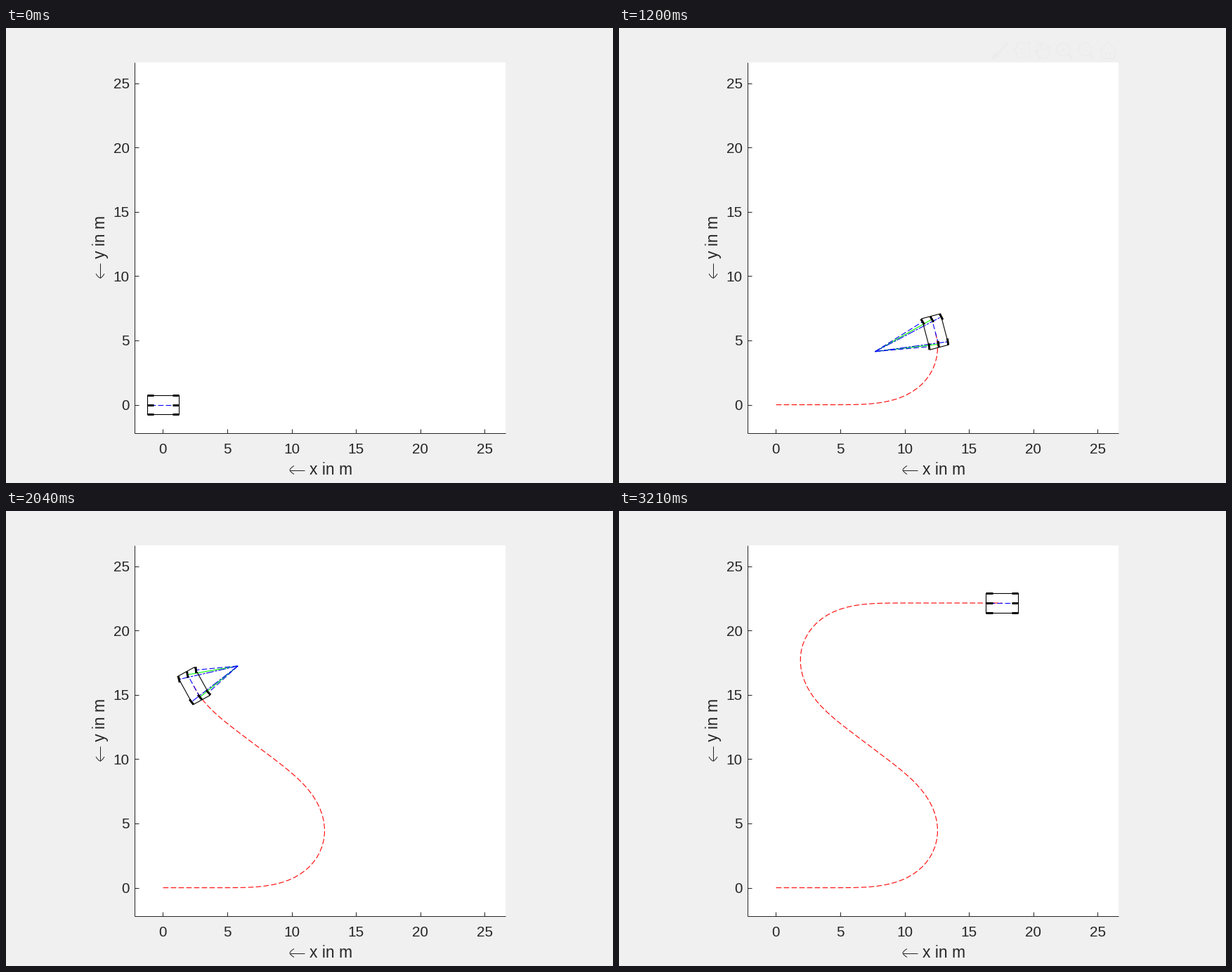
A matplotlib script that plays this animation: 864 px wide and 648 px high, repeating every 3.24 s.

```python
import numpy as np
import matplotlib.pyplot as plt
from matplotlib.animation import FuncAnimation
from matplotlib.patches import Circle, Ellipse, Rectangle

plt.rcParams["font.family"] = "Liberation Sans"
plt.rcParams["toolbar"] = "None"

W, H = 864, 648
SCALE, X0, Y0 = 18.32, 223.4, 536.55
LEFT, RIGHT, TOP, BOTTOM = 183.06, 711.18, 48.6, 576.72
INK, GREY = "#262626", "#cfcfcf"
SLOTS, SLOT_MS = 108, 30

fig = plt.figure(figsize=(W / 72, H / 72), dpi=72, facecolor="#f0f0f0")
ax = fig.add_axes([0, 0, 1, 1])
ax.set_xlim(0, W)
ax.set_ylim(H, 0)
ax.axis("off")


def to_px(p):
    p = np.asarray(p, float)
    return X0 + SCALE * p[..., 0], Y0 - SCALE * p[..., 1]


def stroke(xs, ys, color=INK, lw=1.0, **kw):
    kw.setdefault("solid_capstyle", "butt")
    return ax.plot(xs, ys, color=color, lw=lw, **kw)[0]


# ---- axes frame ----
stage = ax.add_patch(Rectangle((LEFT, TOP), RIGHT - LEFT, BOTTOM - TOP,
                               fc="white", ec="none", zorder=0))
stroke([LEFT, LEFT], [TOP, BOTTOM])
stroke([LEFT, RIGHT], [BOTTOM, BOTTOM])
for v in range(0, 26, 5):
    tx, ty = to_px((v, v))
    stroke([tx, tx], [BOTTOM, BOTTOM - 6])
    stroke([LEFT, LEFT + 6], [ty, ty])
    ax.text(tx, 606, str(v), size=20.8, color=INK, ha="center", va="baseline")
    ax.text(175.5, ty + 7.5, str(v), size=20.8, color=INK, ha="right",
            va="baseline")
ax.text(431.5, 636, "x in m", size=22.9, color=INK, va="baseline")
ax.text(141, 328.5, "y in m", size=22.9, color=INK, rotation=90,
        rotation_mode="anchor", va="baseline")

# label arrows: a shaft and a curved head
u = np.linspace(-1, 1, 21)
head_along, head_across = 6 * np.abs(u) ** 1.6, 6 * u
stroke([404, 425], [629.5, 629.5])
stroke(404 + head_along, 629.5 + head_across)
stroke([134, 134], [335, 356])
stroke(134 + head_across, 356 - head_along)

# ---- fading toolbar ----
tools = []


def icon(xs, ys, lw=1.6):
    tools.append(stroke(xs, ys, GREY, lw, solid_joinstyle="round"))


def magnifier(cx, plus):
    tools.append(ax.add_patch(Circle((cx, 30.5), 9, fc="none", ec=GREY, lw=1.6)))
    icon([cx + 6.5, cx + 13], [37, 44], 2.4)
    icon([cx - 4.5, cx + 4.5], [30.5, 30.5])
    if plus:
        icon([cx, cx], [26, 35])


# brush
icon([553, 541], [20.5, 35], 3.5)
tools.append(ax.add_patch(Ellipse((536, 39.5), 14, 7, angle=-40,
                                  fc=GREY, ec="none")))
# data tip
icon([566, 566, 584, 584, 566, 566, 561, 566], [28, 22, 22, 42, 42, 36, 32, 28])
for y in (29.5, 35):
    icon([570, 580], [y, y])
# hand
arc = np.linspace(0, np.pi, 12)
for i in range(4):
    x, top = 598 + 4.2 * i, 22 + 1.2 * (i - 1) ** 2
    icon(x - 2 * np.cos(arc), top + 1 - 2 * np.sin(arc))
    icon([x - 2, x - 2], [top + 1, 33])
icon([612.6, 612.6], [26, 35])
icon(604.3 + 8.3 * np.cos(arc[:9]), 35 + 9 * np.sin(arc[:9]))
icon([600, 591, 593, 597], [43, 32, 31, 35])
magnifier(632.5, True)
magnifier(663.5, False)
# house
icon([684, 695.7, 708], [33, 20.5, 33])
icon([687, 687, 704.5, 704.5], [31, 44, 44, 31])
icon([693, 693, 699, 699], [44, 36, 36, 44])


def toolbar_alpha(ms):
    return sum(np.interp(ms - start, [0, 300, 360, 530], [0, 1, 1, 0])
               for start in (100, 1170, 2370))


# ---- motion: a left turn, then the same turn to the right ----
START, LENGTH, GAP = 3.95, 19.35, 0.85      # metres along the track
ANGLE = np.radians(143)
CRUISE, RAMP = 0.675, 2.87                  # metres per step, metres to get there
PIVOT = -0.3                                # pivot line behind the centre


def turned(u):
    """Share of the turn done, with a sine-squared curvature."""
    u = np.clip(u, 0, 1)
    return u - np.sin(2 * np.pi * u) / (2 * np.pi)


def steer(u):
    """Curvature set by the wheels, which lead the car."""
    return 0.284 * np.sin(np.pi * np.clip(u / 0.845, 0, 1))


ds = 0.01
s = np.arange(0, 55, ds) + ds / 2
u1 = (s - START) / LENGTH
u2 = u1 - 1 - GAP / LENGTH
track_dir = ANGLE * (turned(u1) - turned(u2))
curve = steer(u1) - steer(u2)
speed = (CRUISE - 0.72 * np.abs(curve)) * np.sqrt(np.minimum(1, s / RAMP))
step_at = np.cumsum(ds / speed)

# the picture pauses at a regular beat
pauses = {1, 91} | {k + d for k in range(14, 81, 11) for d in (0, 1)}
STEP = np.cumsum([0] + [k not in pauses for k in range(1, SLOTS)])


def per_step(values):
    return np.interp(np.arange(STEP[-1] + 1), step_at - step_at[0], values)


TRACK = np.column_stack([per_step(np.cumsum(f(track_dir)) * ds)
                         for f in (np.cos, np.sin)])
CURVE = per_step(curve)
HEADING = per_step(track_dir - 0.16 * curve)     # the car slips a little

# ---- moving artists ----
BODY = np.array([(-1, -1), (1, -1), (1, 1), (-1, 1), (-1, -1)]) * (1.25, 0.75)
WHEELS = [(x, y) for x in (-1, 1) for y in (-.75, 0, .75)]
DASH = (0, (7, 3))
LONG_DASH = (0, (10, 1.5, 3, 1.5))


def mover(color, lw, z, **kw):
    line = stroke([], [], color, lw, zorder=z, **kw)
    line.set_clip_path(stage)
    return line


trail = mover("red", 1.1, 3, ls=DASH)
rays = [mover("blue" if y else "lime", 1.1, 5 if y else 4) for _, y in WHEELS]
spine = mover("blue", 1.1, 5, ls=DASH)
body = mover("black", 1.1, 6)
wheels = [mover("black", 3, 7) for _ in WHEELS]


def update(slot):
    n = STEP[slot]
    c, si = np.cos(HEADING[n]), np.sin(HEADING[n])
    rot = np.array([(c, si), (-si, c)])

    def place(line, pts):
        line.set_data(*to_px(np.asarray(pts) @ rot + TRACK[n]))

    trail.set_data(*to_px(TRACK[:n + 1]))
    place(body, BODY)
    place(spine, [(-1, 0), (1, 0)])

    curv = CURVE[n]
    turning = abs(curv) > 0.02
    for (x, y), wheel, ray in zip(WHEELS, wheels, rays):
        a = np.arctan((x - PIVOT) * curv / (1 - curv * y))
        half = 0.25 * np.array([np.cos(a), np.sin(a)])
        place(wheel, [(x, y) - half, (x, y) + half])
        ray.set_visible(turning)
        if turning:
            place(ray, [(PIVOT, 1 / curv), (x, y)])
            if y:
                ray.set_linestyle(DASH if y * curv > 0 else LONG_DASH)

    alpha = float(toolbar_alpha(slot * SLOT_MS))
    for part in tools:
        part.set_alpha(alpha)
    return [trail, spine, body, *rays, *wheels, *tools]


anim = FuncAnimation(fig, update, frames=SLOTS, interval=SLOT_MS,
                     repeat=True, repeat_delay=0, blit=False)
plt.show()
```
